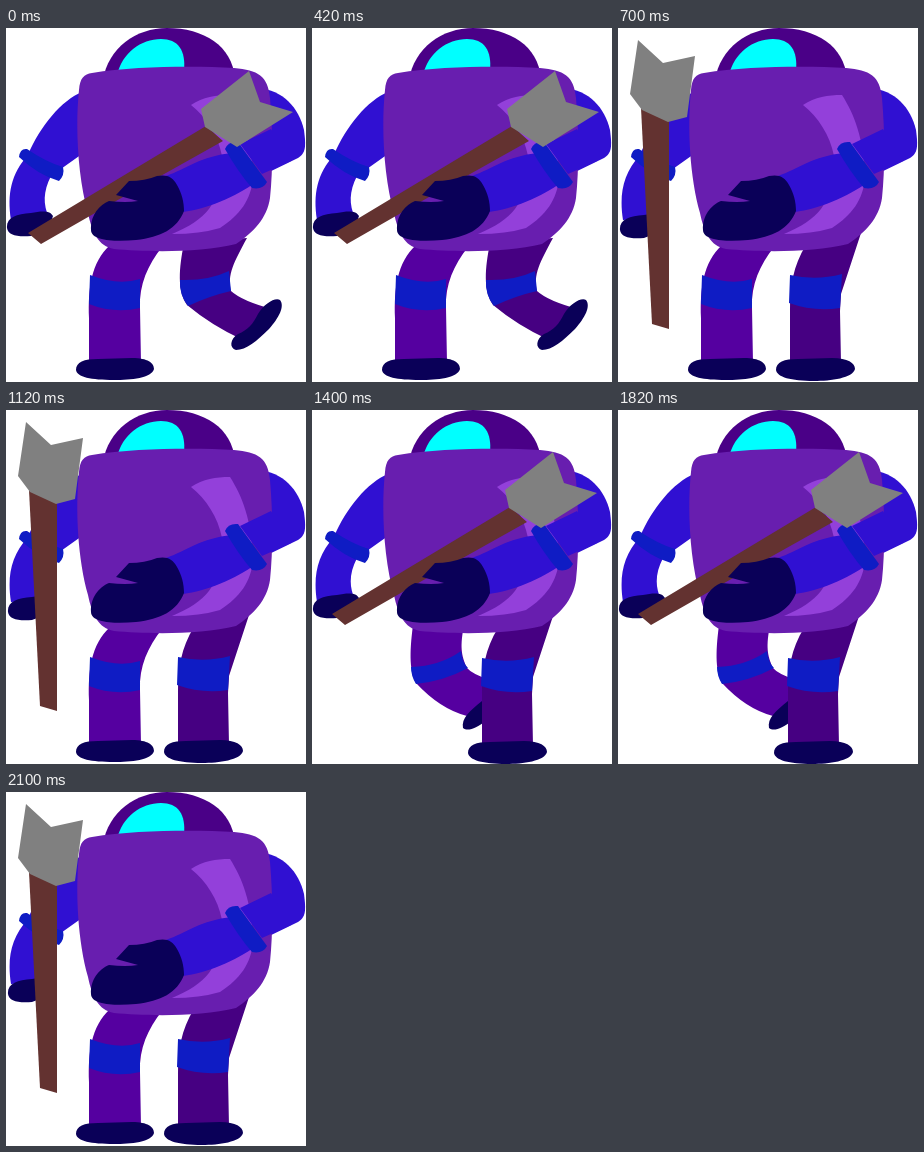
These frames come from a looping animation (300 by 354 pixels, 2.8 s). An HTML page:

```html
<!DOCTYPE html>
<html lang="en">
<head>
<meta charset="utf-8">
<title>Walking spear guard</title>
<style>
  html, body { margin: 0; width: 100%; height: 100%; overflow: hidden; background: #fff; }
  svg { display: block; width: 100vw; height: 100vh; }

  .suit { fill: #681eaf; }
  .shine { fill: #9340da; }
  .helmet { fill: #4a0087; }
  .visor { fill: #0ff; }
  .arm { fill: #3010d2; }
  .band { fill: #0f1cc4; }
  .glove { fill: #0a0058; }
  .near { fill: #5500a0; }
  .far { fill: #460082; }
  .shaft { fill: #633230; }
  .steel { fill: #808080; }

  /* The walk has four held poses of 700 ms. */
  .carry, .plant { animation: blink 1.4s step-end infinite; }
  .plant { animation-delay: -.7s; }
  .far-bent { animation: first 2.8s step-end infinite; }
  .far-straight { animation: not-first 2.8s step-end infinite; }
  .near-bent { animation: first 2.8s step-end -1.4s infinite; }
  .near-straight { animation: not-first 2.8s step-end -1.4s infinite; }
  .spear { animation: slide 2.8s step-end infinite; }
  .far-leg { animation: settle 2.8s step-end infinite; }
  .rest { animation: drop 1.4s step-end infinite; }

  @keyframes blink { 0% { visibility: visible } 50%, 100% { visibility: hidden } }
  @keyframes first { 0% { visibility: visible } 25%, 100% { visibility: hidden } }
  @keyframes not-first { 0% { visibility: hidden } 25%, 100% { visibility: visible } }
  @keyframes slide { 0%, 100% { transform: none } 50% { transform: translate(-2px, -1px) } }
  @keyframes settle { 0%, 75%, 100% { transform: none } 50% { transform: translate(-2px, 1px) } }
  @keyframes drop { 0% { transform: none } 50%, 100% { transform: translate(1px, 2px) } }
</style>
</head>
<body>
<svg viewBox="0 0 300 354" preserveAspectRatio="none">
  <g class="near-straight">
    <path class="near" d="M104 217C85 235 82 260 83 290V335H135L134 280C133 256 142 237 156 219Z"/>
    <path class="band" d="M84 247Q112 258 134 251L134 280Q108 286 83 276Z"/>
    <path class="glove" d="M70 342C70 334 78 331 92 331L126 330C142 330 148 335 148 341C146 350 125 352 108 352C85 352 71 349 70 342Z"/>
  </g>
  <g class="near-bent">
    <path class="near" d="M101 215C97 245 98 262 104 273Q128 299 155 306L178 290V270Q160 264 155 258C149 245 148 236 152 215Z"/>
    <path class="band" d="M99 257Q128 256 149 241Q150 252 156 258Q132 271 104 274Q99 266 99 257Z"/>
    <path class="glove" d="M151 318C149 308 158 301 170 291H174V311C164 318 156 322 151 318Z"/>
  </g>
  <g class="far-bent">
    <path class="far" d="M178 215C173 240 171 262 181 277Q205 297 235 311L266 281Q236 273 225 263C221 247 228 234 241 210Z"/>
    <path class="band" d="M174 252Q202 253 223 243L225 263Q203 268 182 278Q173 267 174 252Z"/>
    <path class="glove" d="M274 272C279 278 273 290 263 301C251 313 240 322 230 322C223 320 224 311 232 306C242 302 247 296 252 286C258 276 269 269 274 272Z"/>
  </g>
  <g class="far-straight"><g class="far-leg">
    <path class="far" d="M243 205L223 266L222 283L223 335H172V282C172 258 175 238 188 217Z"/>
    <path class="band" d="M172 247Q198 253 224 246L222 280Q196 284 171 275Z"/>
    <path class="glove" d="M158 342C158 334 166 331 180 331L214 330C230 330 237 335 237 341C235 350 213 353 196 353C173 353 159 349 158 342Z"/>
  </g></g>

  <path class="arm" d="M76 64C56 72 34 98 22 127C5 146 1 166 5 192L43 190C37 176 37 164 45 148L76 126Z"/>
  <path class="band" d="M13 129Q14 120 21 121Q40 134 57 139Q59 147 53 153Q32 147 13 129Z"/>
  <path class="glove rest" d="M1 200C0 190 10 186 25 185C35 183 44 182 47 188C45 196 38 204 25 208C10 209 2 207 1 200Z"/>

  <path class="arm" d="M252 60C277 62 293 80 298 102C300 118 300 125 292 130L255 148Z"/>
  <path class="helmet" d="M97 52C102 20 130 0 161 0C198 0 226 18 229 50Z"/>
  <path class="visor" d="M111 47C116 25 135 11 155 11C172 11 180 22 178 43Z"/>
  <path class="suit" d="M86 45C130 38 190 38 228 40C252 42 262 48 264 70C267 105 267 140 264 170C261 190 248 204 230 216C195 225 140 224 108 221C92 218 86 204 82 185C72 150 69 100 73 62C74 50 78 46 86 45Z"/>
  <path class="shine" d="M185 77C197 69 210 67 224 67C236 86 246 110 247 150C245 172 234 187 214 200Q194 206 166 206C200 192 214 175 216 140V128C212 107 200 89 185 77Z"/>
  <path class="arm" d="M234 116L265 101L285 133L256 146Z"/>
  <path class="arm" d="M226 125C195 128 180 141 160 148L177 184C200 181 230 169 250 154Z"/>
  <path class="band" d="M219 121Q222 113 232 114L261 154Q257 162 246 160Q232 144 219 121Z"/>

  <g class="carry"><g class="spear">
    <path class="shaft" d="M22 205L35 216L110 173L217 113L200 98Z"/>
    <path class="steel" d="M195 81L243 43L254 74L287 84L231 119L199 99Z"/>
  </g></g>
  <g class="plant">
    <path class="shaft" d="M23 80L51 93V301L34 296Z"/>
    <path class="steel" d="M20 12L45 35L77 28L69 89L50 94L24 82L12 66Z"/>
  </g>
  <path class="glove" d="M110 167L123 153Q139 153 151 148C161 146 167 149 171 157C176 166 178 174 178 183C171 201 155 209 130 212C110 214 85 213 85 202C84 188 93 177 103 173Q120 175 132 173Z"/>
</svg>
</body>
</html>
```
